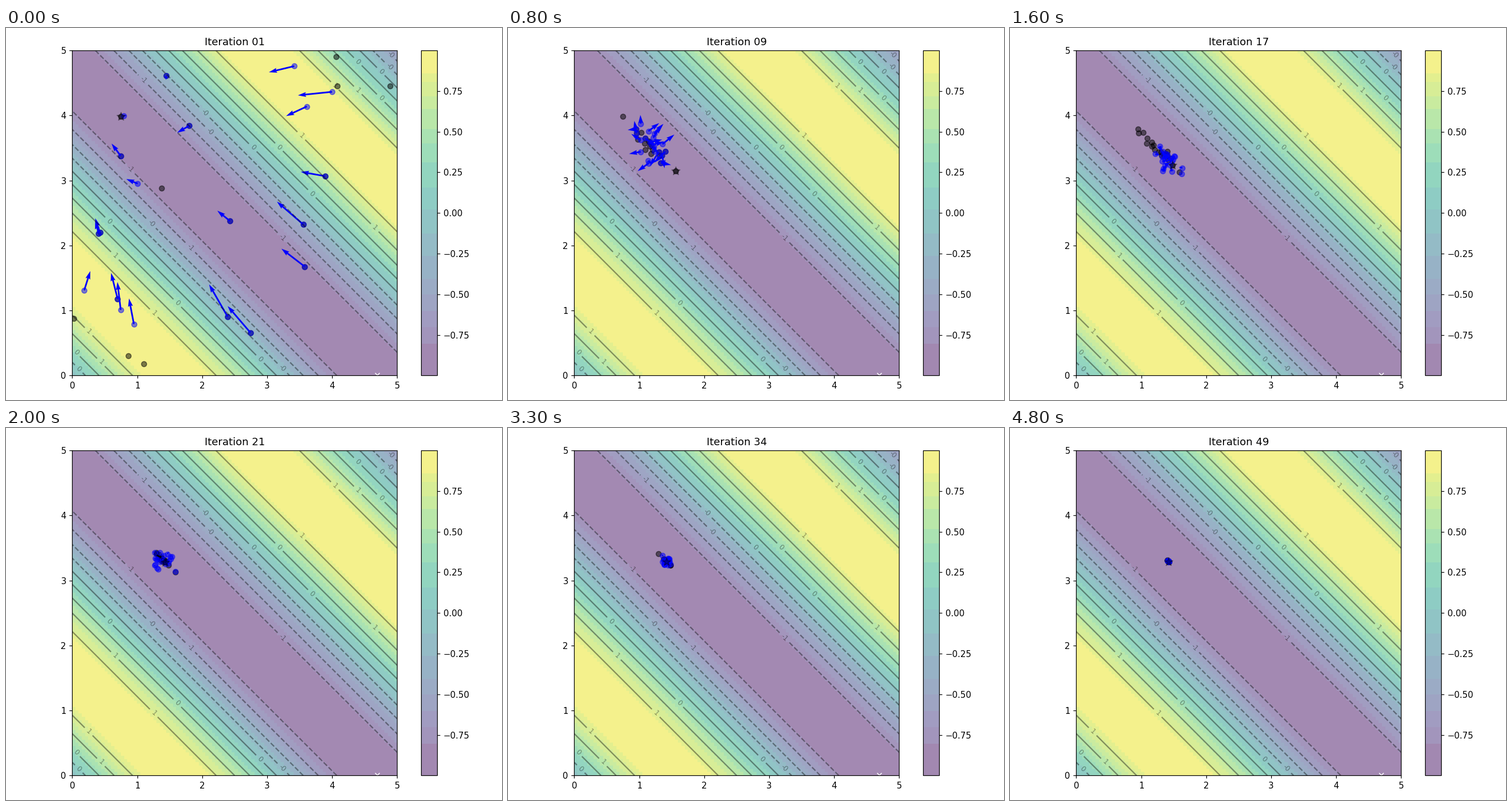
These frames come from a looping animation (864 by 648 pixels, 4900 ms). A matplotlib script:

```python
import numpy as np
import matplotlib.pyplot as plt
from matplotlib.animation import FuncAnimation
from matplotlib.colors import ListedColormap

STEPS = 49
N = 20
W, C1, C2 = 0.8, 0.1, 0.1
WIDTH, HEIGHT, DPI = 864, 648, 108


def f(x, y):
    return np.sin(x + y)


def simulate():
    """Particle swarm states (X, V, pbest, gbest), one per update."""
    rng = np.random.RandomState(100)
    X = rng.rand(2, N) * 5
    V = rng.randn(2, N) * 0.1
    pbest, pbest_obj = X.copy(), f(*X)
    gbest = pbest[:, pbest_obj.argmin()].copy()
    states = []
    for _ in range(STEPS + 1):
        r1, r2 = rng.rand(2)
        V = W * V + C1 * r1 * (pbest - X) + C2 * r2 * (gbest[:, None] - X)
        X = X + V
        obj = f(*X)
        better = pbest_obj >= obj
        pbest = np.where(better, X, pbest)
        pbest_obj = np.minimum(pbest_obj, obj)
        gbest = pbest[:, pbest_obj.argmin()].copy()
        states.append((X, V, pbest, gbest))
    return states


def banded_viridis():
    """Viridis reduced to a few flat bands."""
    edges = np.array([-1, -.81, -.705, -.6, -.5, -.41, -.27, -.125, .02,
                      .16, .31, .43, .52, .64, .72, .81, .86, 1])
    mids = (edges[:-1] + edges[1:]) / 2
    band = np.digitize(np.linspace(-1, 1, 256), edges[1:-1])
    return ListedColormap(plt.get_cmap("viridis")((mids[band] + 1) / 2))


states = simulate()
X, V, pbest, gbest = states[0]

grid = np.linspace(0, 5, 100)
x, y = np.meshgrid(grid, grid)
z = f(x, y)

fig, ax = plt.subplots(figsize=(WIDTH / DPI, HEIGHT / DPI), dpi=DPI)
img = ax.imshow(z, extent=[0, 5, 0, 5], origin="lower",
                cmap=banded_viridis(), alpha=0.5)
fig.colorbar(img, ax=ax)
ax.plot([grid[z[0].argmin()]], [0], marker="x", markersize=5, color="white")
contours = ax.contour(x, y, z, 10, colors="black", alpha=0.4)
ax.clabel(contours, inline=True, fontsize=8, fmt="%.0f")

pbest_plot = ax.scatter(*pbest, marker="o", color="black", alpha=0.5)
p_plot = ax.scatter(*X, marker="o", color="blue", alpha=0.5)
p_arrow = ax.quiver(*X, *V, color="blue", width=0.005,
                    angles="xy", scale_units="xy", scale=1)
gbest_plot = ax.scatter(*gbest, marker="*", s=100, color="black", alpha=0.4)
ax.set_xlim(0, 5)
ax.set_ylim(0, 5)

# Margins in pixels; contour labels are already placed at this point.
fig.subplots_adjust(left=16.2 / WIDTH, right=1 - 16.2 / WIDTH,
                    bottom=42.7 / HEIGHT, top=1 - 39.2 / HEIGHT)


def animate(i):
    X, V, pbest, gbest = states[i]
    ax.set_title(f"Iteration {i:02d}")
    pbest_plot.set_offsets(pbest.T)
    p_plot.set_offsets(X.T)
    p_arrow.set_offsets(X.T)
    p_arrow.set_UVC(*V)
    gbest_plot.set_offsets(gbest[None])


anim = FuncAnimation(fig, animate, frames=range(1, STEPS + 1), interval=100,
                     blit=False, repeat=True, repeat_delay=0)
plt.show()
```
